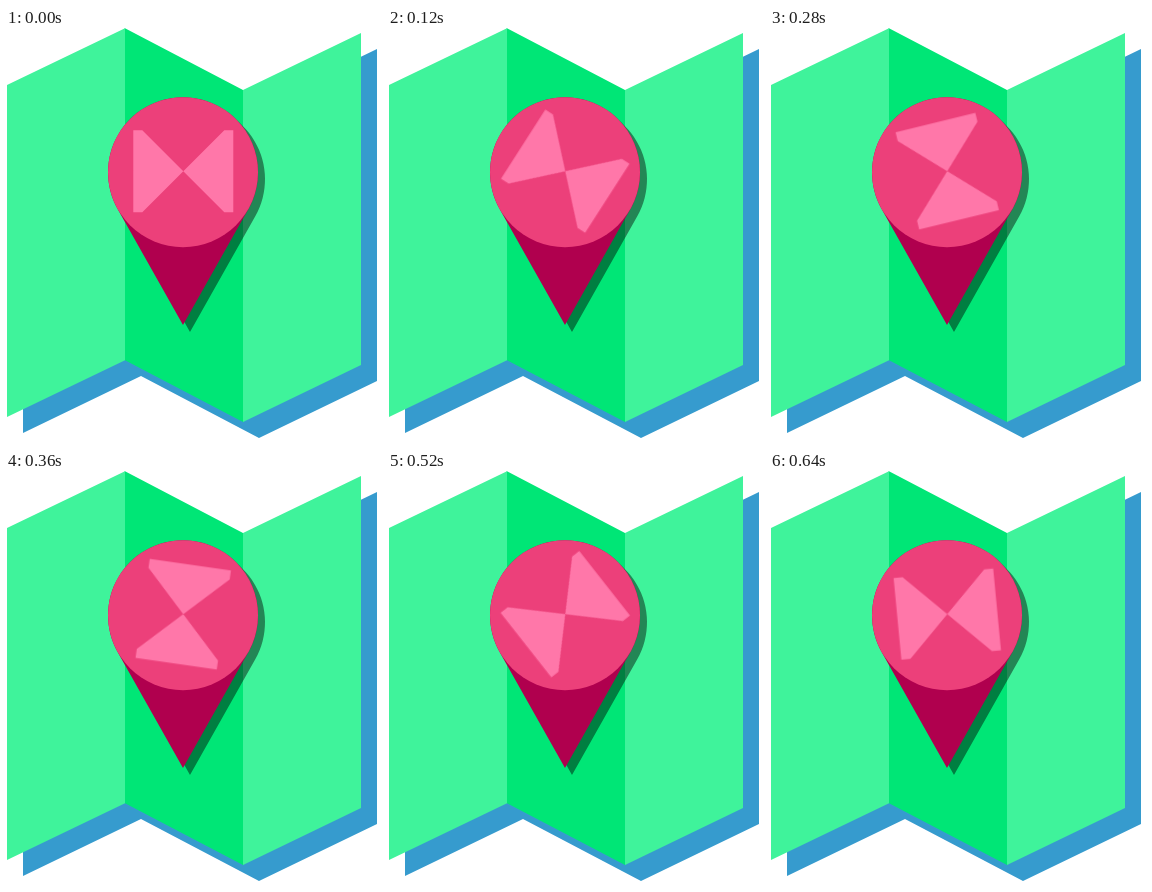
An HTML page for the animation above (0.68 s loop, 376 by 415 pixels).

```html
<!DOCTYPE html>
<html lang="en">
<head>
<meta charset="utf-8">
<title>Map pin</title>
<style>
  html, body { margin: 0; width: 100%; height: 100%; overflow: hidden; background: #fff; }
  svg { display: block; width: 376px; height: 415px; }
  #bow { transform-origin: 177.3px 143.2px; }
</style>
</head>
<body>
<svg viewBox="0 0 376 415">
  <defs>
    <path id="drop" d="M177 297 L111.6 181 A75 75 0 1 1 242.4 181 Z"/>
  </defs>

  <path fill="#369bce" d="M17 73 135 16 253 78 371 21V353L253 410 135 348 17 405Z"/>
  <path fill="#00e676" d="M118.5 0.5 119 0.3 237 62H238V393.5L237 394 119 332.3 118.5 332.5Z"/>
  <path fill="#3ff39b" d="M1 57 119 0.3V332.3L1 389ZM237 62 355 5V337L237 394Z"/>

  <use href="#drop" x="7" y="7" fill="#000" fill-opacity=".45"/>
  <use href="#drop" fill="#b0004e"/>
  <circle cx="177" cy="144.2" r="75" fill="#ec407a"/>
  <path id="bow" fill="#ff77a9"
    d="M127.3 102.2h9l41 41 41-41h9v82h-9l-41-41-41 41h-9Z"/>
</svg>
<script>
  // 33 ticks make a full turn; the loop restarts after 17 of them.
  const TICKS = 17, TICK_MS = 40, TURN = 360 / 33;

  document.getElementById("bow").animate(
    { transform: ["rotate(0deg)", `rotate(${TICKS * TURN}deg)`] },
    { duration: TICKS * TICK_MS, easing: `steps(${TICKS}, end)`, iterations: Infinity }
  );
</script>
</body>
</html>
```
